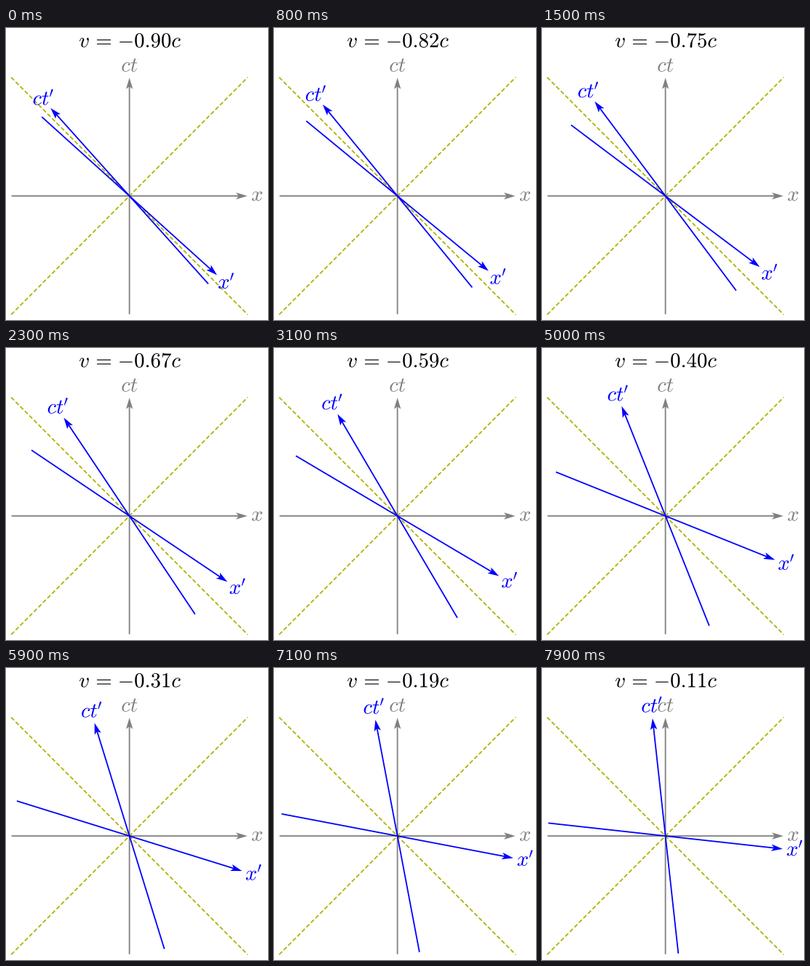
These frames come from a looping animation (360x400 px, 8000 ms). A matplotlib script:

```python
import matplotlib as mpl
import matplotlib.pyplot as plt
import numpy as np
from matplotlib.animation import FuncAnimation
from matplotlib.patches import PathPatch, Polygon
from matplotlib.path import Path
from matplotlib.textpath import TextPath
from matplotlib.transforms import Affine2D

mpl.rcParams["mathtext.fontset"] = "cm"

W, H, DPI = 360, 400, 100
PX = 72 / DPI
OX, OY, R = 169.6, 230.1, 162
EM = 28.8
LINE = 1.8
FRAMES, STEP = 80, 100
GRAY, BLUE, OLIVE = "#808080", "#0000ff", "#b2b200"

# Advance widths and left bearings of the math glyphs, in em.
ADVANCE = {"v": 0.521, "c": 0.433, "t": 0.361, "x": 0.572,
           "=": 0.778, "-": 0.778, ".": 0.278}
BEARING = {"=": 0.056, "-": 0.083}
REL_SPACE = 0.278
PRIME_SIZE, PRIME_RAISE, PRIME_WIDTH = 0.694, 0.363, 0.191

fig = plt.figure(figsize=(W / DPI, H / DPI), dpi=DPI, facecolor="white")
ax = fig.add_axes([0, 0, 1, 1])
ax.set(xlim=(0, W), ylim=(H, 0))
ax.axis("off")

cache = {}


def glyph(ch):
    """Outline of one math glyph with its pen origin at (0, 0), y down."""
    if ch not in cache:
        size = EM * (PRIME_SIZE if ch == "'" else 1)
        path = TextPath((0, 0), r"$\prime$" if ch == "'" else f"${ch}$", size=size)
        shift = 0
        if ch in BEARING:
            shift = BEARING[ch] * EM - path.get_extents().x0
        rise = PRIME_RAISE * EM if ch == "'" else 0
        cache[ch] = Affine2D().translate(shift, rise).scale(1, -1).transform_path(path)
    return cache[ch]


def typeset(text):
    """Path of a formula starting at the origin, and its width."""
    parts, pen = [], 0
    for ch in text:
        space = REL_SPACE if ch == "=" else 0
        pen += space * EM
        parts.append(Affine2D().translate(pen, 0).transform_path(glyph(ch)))
        width = PRIME_WIDTH if ch == "'" else ADVANCE.get(ch, 0.5)
        pen += (width + space) * EM
    return Path.make_compound_path(*parts), pen


def place(text, cx, baseline):
    path, width = typeset(text)
    return Affine2D().translate(cx - width / 2, baseline).transform_path(path)


def label(color, z):
    patch = PathPatch(Path([(0, 0)]), fc=color, lw=0, zorder=z, snap=False)
    ax.add_patch(patch)
    return patch


class Axis:
    """Straight axis through the centre with a notched arrowhead."""

    HEAD = np.array([(0, 0), (-15.5, 4.7), (-12, 0), (-15.5, -4.7)])

    def __init__(self, color, z):
        self.line, = ax.plot([], [], color=color, lw=LINE * PX, zorder=z,
                             solid_capstyle="butt", snap=False)
        self.head = Polygon(self.HEAD, fc=color, lw=0, zorder=z, snap=False)
        ax.add_patch(self.head)

    def aim(self, dx, dy):
        d, n = np.array([dx, dy]), np.array([-dy, dx])
        c = np.array([OX, OY])
        self.line.set_data(*np.array([c - R * d, c + (R - 11.5) * d]).T)
        self.head.set_xy(c + R * d + self.HEAD @ np.array([d, n]))


for s in (-1, 1):
    ax.plot([OX - R - 0.5, OX + R + 0.5], [OY - s * (R + 0.5), OY + s * (R + 0.5)],
            color=OLIVE, lw=LINE * PX, ls=(0, (3.2, 1.7)), zorder=1,
            dash_capstyle="butt", snap=False)

Axis(GRAY, 2).aim(1, 0)
Axis(GRAY, 2).aim(0, -1)
label(GRAY, 2).set_path(place("x", 345.2, 236.8))
label(GRAY, 2).set_path(place("ct", OX, 59.8))

x_axis, t_axis = Axis(BLUE, 3), Axis(BLUE, 3)
x_label, t_label = label(BLUE, 3), label(BLUE, 3)
title = label("black", 3)


def update(i):
    v = -(90 - i) / 100
    title.set_path(place(f"v={v:.2f}c", 170, 26.4))
    cos = 1 / np.hypot(1, v)
    sin = v * cos
    x_axis.aim(cos, -sin)
    t_axis.aim(sin, -cos)
    far = 1.1 * R
    x_label.set_path(place("x'", OX + far * cos, OY - far * sin + 7.7))
    t_label.set_path(place("ct'", OX + far * sin + 0.3, OY - far * cos + 7.7))
    return x_axis.line, t_axis.line, x_axis.head, t_axis.head, x_label, t_label, title


anim = FuncAnimation(fig, update, frames=FRAMES, interval=STEP,
                     repeat=True, repeat_delay=0, blit=False)
plt.show()
```
